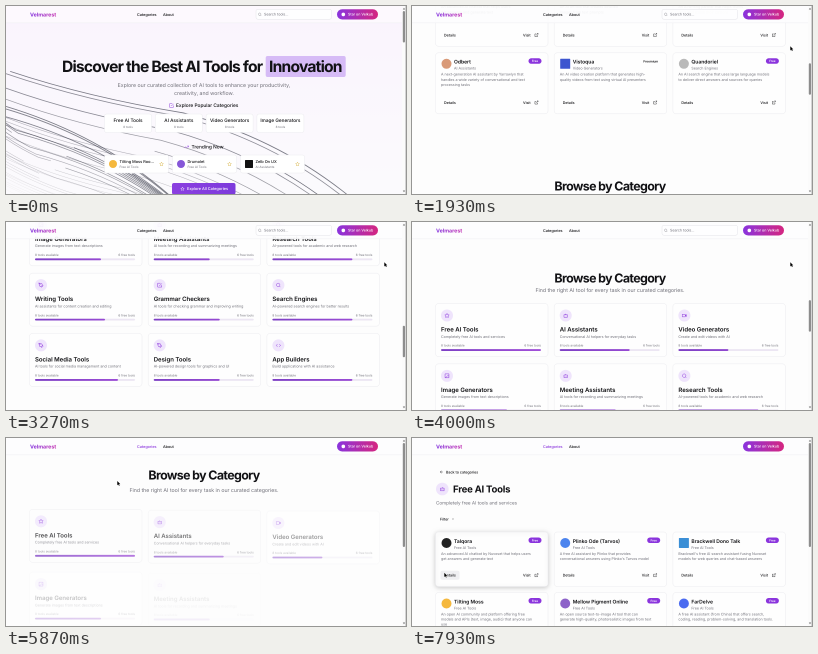
An HTML page with a canvas for the animation above (8 s loop, 400 by 188 pixels).

```html
<!DOCTYPE html>
<html lang="en">
<head>
<meta charset="utf-8">
<title>AI tools directory</title>
<style>
html, body { margin: 0; height: 100%; overflow: hidden; background: #fdfdfd; }
canvas { display: block; width: 400px; height: 188px; }
</style>
</head>
<body>
<canvas></canvas>
<script>
const W = 400, H = 188, LOOP = 8000;
const INK = '#111114', GRAY = '#71717a', PURPLE = '#8b35dd', LINE = '#ececf0';
const canvas = document.querySelector('canvas'), ctx = canvas.getContext('2d');
// Oversampling keeps the tiny type smooth and free of hinting
const scale = 2 * (window.devicePixelRatio || 1);
canvas.width = W * scale;
canvas.height = H * scale;

const ICONS = {
  search: 'M11 3a8 8 0 1 0 .01 0M21 21l-4.3-4.3',
  pen: 'M12 19l7-7 3 3-7 7zM18 13l-1.5-7.5L2 2l3.5 14.5L13 18zM2 2l7.6 7.6',
  check: 'M9 11l3 3L22 4M21 12v9H3V3h13',
  code: 'M16 18l6-6-6-6M8 6l-6 6 6 6',
  image: 'M3 3h18v18H3zM21 15l-5-5L5 21',
  bot: 'M4 8h16v12H4zM12 8V4M9 13v2M15 13v2',
  video: 'M2 6h14v12H2zM16 12l6-4v8z',
  star: 'M12 2l3.1 6.3 6.9 1-5 4.9 1.2 6.8-6.2-3.2-6.2 3.2 1.2-6.9-5-4.8 6.9-1z',
  trend: 'M22 7l-8.5 8.5-5-5L2 17M16 7h6v6',
  link: 'M15 3h6v6M10 14L21 3M18 13v8H3V6h8',
  back: 'M19 12H5M12 19l-7-7 7-7',
  down: 'M6 9l6 6 6-6'
};

const clamp = v => Math.max(0, Math.min(1, v));
const ramp = (t, start, length) => clamp((t - start) / length);

// Linear interpolation through [time, value...] keys
function track(keys, t) {
  const k = keys.findIndex(key => key[0] > t);
  if (k < 0) return keys[keys.length - 1].slice(1);
  if (!k) return keys[0].slice(1);
  const a = keys[k - 1], b = keys[k], p = (t - a[0]) / (b[0] - a[0]);
  return a.slice(1).map((v, i) => v + (b[i + 1] - v) * p);
}

// y is the middle of the capitals
function text(str, x, y, size, color = INK, weight = 400, align = 'left', tracking = 0) {
  ctx.font = `${weight} ${size}px Inter, sans-serif`;
  ctx.textRendering = 'geometricPrecision';
  ctx.letterSpacing = tracking * size + 'px';
  ctx.textAlign = align;
  ctx.fillStyle = color;
  ctx.fillText(str, x, y + size * .36);
}

function box(x, y, w, h, r, fill, stroke) {
  ctx.beginPath();
  ctx.roundRect(x, y, w, h, r);
  if (fill) { ctx.fillStyle = fill; ctx.fill(); }
  if (stroke) { ctx.strokeStyle = stroke; ctx.lineWidth = .5; ctx.stroke(); }
}

const disc = (x, y, r, fill) => box(x - r, y - r, 2 * r, 2 * r, r, fill);

function icon(name, x, y, size, color) {
  ctx.save();
  ctx.translate(x - size / 2, y - size / 2);
  ctx.scale(size / 24, size / 24);
  ctx.strokeStyle = color;
  ctx.lineWidth = 2.2;
  ctx.stroke(new Path2D(ICONS[name]));
  ctx.restore();
}

function blend(x0, x1, from, to) {
  const g = ctx.createLinearGradient(x0, 0, x1, 0);
  g.addColorStop(0, from);
  g.addColorStop(1, to);
  return g;
}

// Fades in while sliding up into place
function reveal(shown, slide, draw) {
  if (shown <= 0) return;
  ctx.save();
  ctx.globalAlpha *= shown;
  ctx.translate(0, slide * (1 - shown));
  draw();
  ctx.restore();
}

let seed = 7;
const random = () => (seed = seed * 16807 % 2147483647) / 2147483647;

// Two mirrored fans of 36 long S-curves, each with its own slow cycle
const strands = [];
for (const side of [1, -1]) {
  for (let i = 0; i < 36; i++) {
    const dx = i * 5 * side, dy = i * 6;
    const pt = (x, y) => [x - dx * (x < 0 ? -1 : 1), y - dy];
    const a = pt(-380, -189), b = pt(-312, 216), c = pt(152, 343), d = pt(616, 470), e = pt(684, 875);
    const path = new Path2D(`M${a}C${a} ${b} ${c}C${d} ${e} ${e}`);
    let length = 0;
    for (const [p, q, r, s] of [[a, a, b, c], [c, d, e, e]]) {
      let last = p;
      for (let u = .05; u < 1.01; u += .05) {
        const v = 1 - u;
        const next = [0, 1].map(k => v * v * v * p[k] + 3 * v * v * u * q[k] + 3 * v * u * u * r[k] + u * u * u * s[k]);
        length += Math.hypot(next[0] - last[0], next[1] - last[1]);
        last = next;
      }
    }
    strands.push({
      path, length, width: .5 + i * .03, alpha: Math.min(1, .1 + i * .03),
      phase: .5 + random() * .6, period: 20 + random() * 10
    });
  }
}

function drawStrands(t) {
  ctx.save();
  ctx.beginPath();
  ctx.rect(0, 0, 396, 222);
  ctx.clip();
  ctx.translate(0, 21);
  ctx.scale(.569, .569);
  ctx.strokeStyle = '#020617';
  for (const s of strands) {
    const p = (s.phase + t / 1000 / s.period) % 1, wave = 1 - Math.abs(2 * p - 1);
    ctx.globalAlpha = s.alpha * (.4 + .3 * wave);
    ctx.lineWidth = s.width;
    ctx.setLineDash([(.3 + .7 * p) * s.length, s.length]);
    ctx.lineDashOffset = -wave * s.length;
    ctx.stroke(s.path);
  }
  ctx.restore();
}

const COLUMN = 118.7, LEFT = 23.5, CARD = 112.5;
const each = (list, draw) => list.forEach((item, i) => draw(item, LEFT + i % 3 * COLUMN, Math.floor(i / 3), i));

function logo(color, x, y, r, square) {
  box(x - r, y - r, 2 * r, 2 * r, square ? .6 : r, color);
}

// tool: [name, category, badge, colour, square logo, ...description lines]
function toolCard([name, kind, badge, color, square, ...lines], x, y, h, hover) {
  ctx.save();
  if (hover) { ctx.shadowColor = 'rgba(0,0,0,.2)'; ctx.shadowBlur = 5 * scale; ctx.shadowOffsetY = scale; }
  box(x, y, CARD, h, 3, '#fefefe', LINE);
  ctx.restore();
  logo(color, x + 11, y + 11, 5, square);
  text(name, x + 18.5, y + 9, 5, INK, 600);
  text(kind, x + 18.5, y + 15.5, 3.64, GRAY);
  if (badge === 'Free') {
    box(x + 93, y + 5.5, 13, 5.5, 2.7, PURPLE);
    text(badge, x + 99.5, y + 8.2, 3, '#fff', 600, 'center');
  } else text(badge, x + 104, y + 8.5, 3.1, INK, 600, 'right');
  lines.forEach((s, i) => text(s, x + 5.5, y + 21.5 + i * 5.2, 3.64, GRAY));
  const foot = y + h - 11.3;
  if (hover) box(x + 5, foot - 4.5, 19, 9, 2, '#efeff2');
  text('Details', x + 8.5, foot, 3.64, INK, 500);
  text('Visit', x + 87.5, foot, 3.64, INK, 500);
  icon('link', x + 101, foot, 4.2, INK);
}

const FEATURED = [
  ['Talqora', 'Free AI Tools', 'Free', '#333', 0, 'An advanced AI chatbot that helps users', 'get answers and generate text'],
  ['Fenwhistle', 'Image Generators', 'Freemium', '#bbb', 1, 'An AI art tool that creates detailed', 'images from text prompts'],
  ['Brindalo', 'Writing Tools', 'Freemium', '#999', 0, 'An AI writing partner that helps teams', 'draft and polish their content'],
  ['Odbert', 'AI Assistants', 'Free', '#d99a78', 0, 'A next-generation AI assistant by Yarrowlyn that', 'handles a wide variety of conversational and text', 'processing tasks'],
  ['Vistoqua', 'Video Generators', 'Freemium', '#3d55cf', 1, 'An AI video creation platform that generates high-', 'quality videos from text using virtual AI presenters'],
  ['Quandoriel', 'Search Engines', 'Free', '#b9b9b9', 0, 'An AI search engine that uses large language models', 'to deliver direct answers and sources for queries']
];

const FREE = [
  ['Talqora', 'Free AI Tools', 'Free', '#222', 0, 'An advanced AI chatbot by Nuvoset that helps users', 'get answers and generate text'],
  ['Plinko Ode (Tarvos)', 'Free AI Tools', 'Free', '#4c84ee', 0, 'A free AI assistant by Plinko that provides', "conversational answers using Plinko's Tarvos model"],
  ['Brackwell Dono Talk', 'Free AI Tools', 'Free', '#3b8fd6', 1, "Brackwell's free AI search assistant fusing Nuvoset", 'models for web queries and chat-based answers'],
  ['Tilting Moss', 'Free AI Tools', 'Free', '#f5b83d', 0, 'An open AI community and platform offering free', 'models and APIs (text, image, audio) that anyone can', 'use'],
  ['Mellow Pigment Online', 'Free AI Tools', 'Free', '#8d62c9', 0, 'An open source text-to-image AI tool that can', 'generate high-quality, photorealistic images from text'],
  ['FarDelve', 'Free AI Tools', 'Free', '#4b6bf0', 0, 'A free AI assistant (from China) that offers search,', 'coding, reading, problem-solving, and translation tools.']
];

// [name, icon, filled share, description]
const CATEGORIES = [
  ['Free AI Tools', 'star', 1, 'Completely free AI tools and services'],
  ['AI Assistants', 'bot', .7, 'Conversational AI helpers for everyday tasks'],
  ['Video Generators', 'video', .5, 'Create and edit videos with AI'],
  ['Image Generators', 'image', .66, 'Generate images from text descriptions'],
  ['Meeting Assistants', 'bot', .56, 'AI tools for recording and summarizing meetings'],
  ['Research Tools', 'search', .8, 'AI-powered tools for academic and web research'],
  ['Writing Tools', 'pen', .7, 'AI assistants for content creation and editing'],
  ['Grammar Checkers', 'check', .66, 'AI tools for checking grammar and improving writing'],
  ['Search Engines', 'search', .8, 'AI-powered search engines for better results'],
  ['Social Media Tools', 'pen', .83, 'AI tools for social media management and content'],
  ['Design Tools', 'pen', .66, 'AI-powered design tools for graphics and UI'],
  ['App Builders', 'code', .8, 'Build applications with AI assistance']
];

function categoryCard([name, glyph, share, about], x, y) {
  box(x, y, CARD, 53, 3, '#fefefe', LINE);
  disc(x + 11.5, y + 12, 6, '#efe4fc');
  icon(glyph, x + 11.5, y + 12, 5.2, PURPLE);
  text(name, x + 5.5, y + 25.8, 6, INK, 600);
  text(about, x + 5.5, y + 33, 3.64, GRAY);
  text('8 tools available', x + 5.5, y + 42, 3.1, GRAY);
  text('6 free tools', x + 105.5, y + 42, 3.1, GRAY, 400, 'right');
  box(x + 5.5, y + 45.6, 100, 1.8, .9, '#ece6f3');
  box(x + 5.5, y + 45.6, 100 * share, 1.8, .9, blend(x, x + 100, '#7c3fc4', '#a04fd8'));
}

const heading = (str, y, size) => text(str, 198, y, size, INK, 700, 'center', -.05);

function hero(t) {
  const wash = ctx.createLinearGradient(0, 0, 0, 222);
  wash.addColorStop(0, '#faf4fd');
  wash.addColorStop(1, '#fcfcfd');
  ctx.fillStyle = wash;
  ctx.fillRect(0, 0, 396, 222);
  drawStrands(t);

  text('Discover the Best AI Tools for', 56, 60.5, 15.6, INK, 700, 'left', -.05);
  box(259.7, 50, 80, 21, 2, '#d6bbf6');
  text('Innovation', 263, 60.5, 15.6, INK, 700, 'left', -.05);
  text('Explore our curated collection of AI tools to enhance your productivity,', 198, 79, 5.2, GRAY, 400, 'center');
  text('creativity, and workflow.', 198, 87, 5.2, GRAY, 400, 'center');

  icon('check', 165.5, 99.5, 5, PURPLE);
  text('Explore Popular Categories', 170, 99.5, 4.8, INK, 500);
  ['Free AI Tools', 'AI Assistants', 'Video Generators', 'Image Generators'].forEach((name, i) => {
    const x = 98.5 + i * 50.8;
    box(x, 108, 47, 18.5, 2, '#fff', LINE);
    text(name, x + 23.5, 114.3, 4.7, INK, 500, 'center');
    text('8 tools', x + 23.5, 121, 3, GRAY, 400, 'center');
  });

  icon('trend', 180.5, 141, 5, PURPLE);
  text('Trending Now', 185.5, 141, 4.8, INK, 500);
  [['Tilting Moss Roo...', 'Free AI Tools', '#f5b83d'], ['Drumolet', 'Free AI Tools', '#8657d8'],
    ['Zelb On UX', 'AI Assistants', '#111', 1]].forEach(([name, kind, color, square], i) => {
    const x = 98.5 + i * 68;
    box(x, 149, 64, 18, 2, '#fff', LINE);
    logo(color, x + 8.5, 158, 4, square);
    text(name, x + 15, 155.8, 3.9, INK, 500);
    text(kind, x + 15, 160.8, 3.1, GRAY);
    icon('star', x + 57, 158, 4.6, '#d9b64a');
  });

  box(166, 177, 63.5, 11.5, 2, blend(166, 230, '#8b3fe0', '#7d3bdc'));
  icon('star', 176.5, 182.8, 4.2, '#fff');
  text('Explore All Categories', 181, 182.8, 3.9, '#fff', 500);
}

function home(t, scroll) {
  ctx.save();
  ctx.translate(0, -scroll);
  if (scroll < 222) hero(t);
  heading('Featured AI Tools', 262, 12.4);
  text('Explore the most popular AI tools that are transforming industries.', 198, 274, 5.2, GRAY, 400, 'center');
  each(FEATURED, (tool, x, row, i) => {
    const shown = ramp(t, 860 + row * 450 + i % 3 * 120, 360);
    reveal(shown, 5, () => toolCard(tool, x, 288.5 + row * 67.5, 61));
  });
  heading('Browse by Category', 489, 12.4);
  text('Find the right AI tool for every task in our curated categories.', 198, 501, 5.2, GRAY, 400, 'center');
  each(CATEGORIES, (item, x, row, i) => {
    const shown = ramp(t, 2050 + row * 260 + i % 3 * 60, 300);
    reveal(shown, 5, () => categoryCard(item, x, 514.6 + row * 60.3));
  });
  ctx.restore();
}

function categories(t) {
  reveal(ramp(t, 5600, 250), 0, () => {
    heading('Browse by Category', 37, 12.4);
    text('Find the right AI tool for every task in our curated categories.', 198, 52, 5.2, GRAY, 400, 'center');
  });
  each(CATEGORIES, (item, x, row, i) =>
    reveal(ramp(t, 5650 + i * 50, 300), 5, () => categoryCard(item, x, 70 + row * 60.3)));
}

function detail(t) {
  reveal(ramp(t, 7070, 250), 0, () => {
    icon('back', 29.5, 34, 4.4, INK);
    text('Back to categories', 34, 34, 3.64, INK, 500);
    disc(30.3, 51, 6.3, '#efe4fc');
    icon('bot', 30.3, 51, 5.4, PURPLE);
    text('Free AI Tools', 41, 51, 9.6, INK, 700, 'left', -.025);
    text('Completely free AI tools and services', 24, 65, 4.6, GRAY);
    text('Filter', 28, 81, 3.64, INK, 500);
    icon('down', 41, 81, 3.6, INK);
  });
  each(FREE, (tool, x, row, i) =>
    reveal(ramp(t, 7120 + i * 60, 300), 5, () =>
      toolCard(tool, x, 94 + row * 60.5, row ? 61 : 54.5, !i && t > 7600)));
}

function header(onHome, scroll) {
  ctx.fillStyle = !onHome || scroll > 5 ? 'rgba(253,253,254,.93)' : 'rgba(255,255,255,.45)';
  ctx.fillRect(0, 0, 396, 17);
  ctx.fillStyle = LINE;
  ctx.fillRect(0, 16.7, 396, .4);
  text('Velmarest', 24, 8.5, 5.3, blend(24, 52, '#8232df', '#c72fae'), 700);
  text('Categories', 131, 8.5, 3.75, onHome ? INK : PURPLE, 500);
  text('About', 157, 8.5, 3.75, INK, 500);
  if (onHome) {
    box(250, 3.3, 75.5, 10, 2, 'rgba(255,255,255,.8)', '#e4e4e9');
    icon('search', 253.8, 8.4, 3.8, GRAY);
    text('Search tools...', 258, 8.4, 3.64, GRAY);
  }
  box(331, 3.2, 41, 10.3, 5.2, blend(331, 372, '#8a34de', '#d52680'));
  disc(337.3, 8.4, 1.8, '#fff');
  text('Star on Velkub', 342, 8.4, 3.64, '#fff', 500);
}

function scrollbar(top, length) {
  ctx.fillStyle = '#fbfbfb';
  ctx.fillRect(396, 0, 4, H);
  box(396.8, top, 2.2, length, 1.1, '#8d8d8d');
  ctx.fillStyle = '#777';
  ctx.fill(new Path2D('M396.8 3.5h2.4l-1.2-1.8zM396.8 184.5h2.4l-1.2 1.8z'));
}

function pointer(x, y) {
  ctx.save();
  ctx.translate(x, y);
  const arrow = new Path2D('M-1.2-2.2v4.2l1-.9.7 1.5.7-.3-.7-1.4h1.3z');
  ctx.strokeStyle = '#fff';
  ctx.lineWidth = .6;
  ctx.stroke(arrow);
  ctx.fillStyle = '#000';
  ctx.fill(arrow);
  ctx.restore();
}

const SCROLL = [[0, 0], [550, 0], [720, 26], [1130, 122], [1930, 309], [3270, 584], [3520, 600], [3700, 590], [4400, 225], [4700, 30], [4850, 0]];
const CURSOR = [[500, 404, 44], [850, 379.5, 42.5], [4450, 379.5, 42.5], [5000, 107.5, 29], [5300, 139, 10], [5600, 139, 10], [6300, 70.5, 101], [7000, 70.5, 101], [7650, 33, 137], [7900, 33.5, 137]];

function frame(now) {
  const t = now % LOOP, [scroll] = track(SCROLL, t);
  const onHome = t < 5470, onCategories = t >= 5560 && t < 6560, onDetail = t >= 7060;
  ctx.setTransform(scale, 0, 0, scale, 0, 0);
  ctx.fillStyle = '#fdfdfd';
  ctx.fillRect(0, 0, W, H);
  if (onHome) home(t, scroll);
  if (onCategories) categories(t);
  if (onDetail) detail(t);
  if (onHome || onCategories || onDetail) {
    header(onHome, scroll);
    scrollbar(5 + (onHome ? scroll * .169 : 0), onHome ? 31.5 : 104);
  }
  ctx.fillStyle = '#c4c4c4';
  ctx.fillRect(399.3, 0, .7, H);
  pointer(...track(CURSOR, t));
  requestAnimationFrame(frame);
}
requestAnimationFrame(frame);
</script>
</body>
</html>
```
